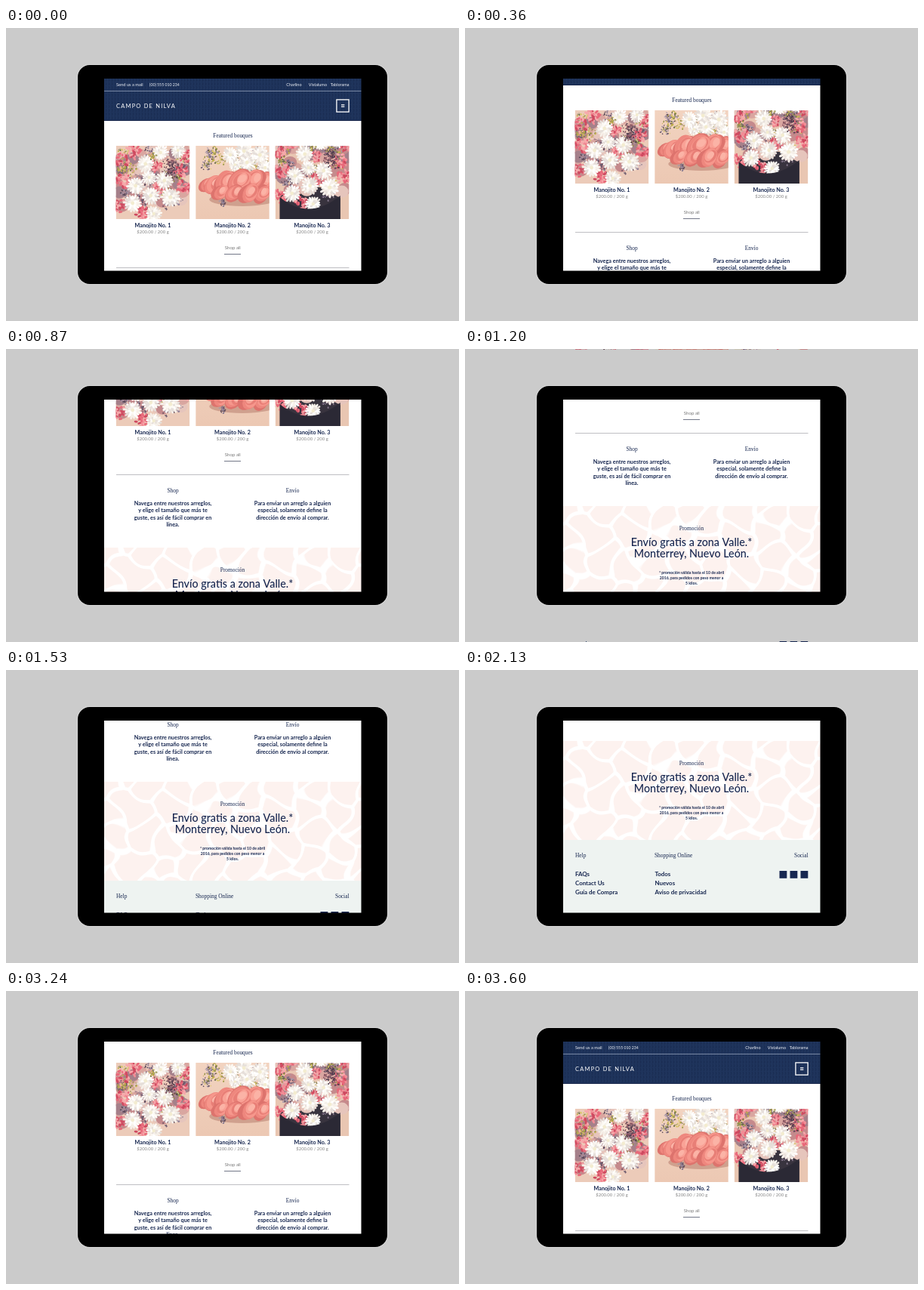
Write an HTML page with a canvas that moves like this. It is 600 by 388 pixels and loops after 4.4 s.

```html
<!DOCTYPE html>
<html lang="es">
<head>
<meta charset="utf-8">
<title>Tablet shop scroll</title>
<style>
html, body { margin: 0; width: 100%; height: 100%; overflow: hidden; background: #cbcbcb; }
canvas { display: block; }
</style>
</head>
<body>
<canvas id="stage" width="600" height="388"></canvas>
<script>
const W = 600, H = 388, LOOP = 4400, STEP = 30;
const SCREEN = { x: 130, y: 67, w: 340.5, h: 254.5 };
const NAVY = '#172750', SANS = 'Lato, sans-serif', SERIF = '"Liberation Serif", serif';
const TAU = Math.PI * 2;

const page = document.createElement('canvas');
page.width = W;
page.height = 720;
const p = page.getContext('2d');
const stage = document.getElementById('stage').getContext('2d');

let seed = 7;
function rnd(a = 0, b = 1) {
  seed = (seed * 16807) % 2147483647;
  return a + (b - a) * seed / 2147483647;
}
const pick = list => list[Math.floor(rnd(0, list.length))];

function rect(x, y, w, h, color) {
  p.fillStyle = color;
  p.fillRect(x, y, w, h);
}

function oval(x, y, rx, ry, color, turn = 0) {
  p.fillStyle = color;
  p.beginPath();
  p.ellipse(x, y, rx, ry, turn, 0, TAU);
  p.fill();
}

function text(str, x, y, size, { font = SANS, weight = 400, color = NAVY, align = 'left', spacing = 0 } = {}) {
  p.font = `${weight} ${size}px ${font}`;
  p.letterSpacing = spacing + 'px';
  p.textAlign = align;
  p.fillStyle = color;
  p.fillText(str, x, y);
}

const heading = (str, x, y, align = 'center') => text(str, x, y, 7.4, { font: SERIF, align });

function lines(list, x, y, gap, size, style) {
  list.forEach((str, i) => text(str, x, y + i * gap, size, style));
}

// Flowers, in the local space of a photo
function mum(x, y, r) {
  for (let ring = 3; ring > 0; ring--) {
    const count = 5 + ring * 4, twist = rnd();
    for (let i = 0; i < count; i++) {
      const a = twist + i / count * TAU, d = r * ring * rnd(0.2, 0.28);
      oval(x + Math.cos(a) * d, y + Math.sin(a) * d, r * 0.26, r * 0.13,
        pick(['#ffffff', '#fdfaf4', '#f6f0e9', '#e6dfda']), a);
    }
  }
  oval(x, y, r * 0.2, r * 0.2, '#f3ecd0');
}

function carnation(x, y, r) {
  for (let i = 0; i < 34; i++) {
    const a = rnd(0, TAU), d = r * Math.sqrt(rnd()) * 0.9;
    oval(x + Math.cos(a) * d, y + Math.sin(a) * d, r * 0.26, r * 0.14,
      pick(['#e8697a', '#f28d96', '#cf4a60', '#f6a9ab']), rnd(0, 3));
  }
}

function sprig(x, y, r, colors) {
  for (let i = 0; i < 24; i++) {
    const a = rnd(0, TAU), d = r * rnd();
    oval(x + Math.cos(a) * d, y + Math.sin(a) * d, rnd(0.6, 1.7), rnd(0.5, 1.1), pick(colors), rnd(0, 3));
  }
}

// Slanted petals, folded over each other from dark to light
function rose(x, y, r) {
  ['#dd736d', '#ee877e', '#f6978c', '#e87f77', '#f9a296', '#fbb3a6'].forEach((color, i) => {
    const size = r * (1 - i * 0.13);
    oval(x + rnd(-2, 2) + i * 0.8, y - i * 0.7, size * 0.72, size * 1.05, color, 0.7 + rnd(-0.4, 0.4));
  });
}

const DUSK = ['#6c5a70', '#8b7d92', '#5a4858', '#a898aa'];
const BERRY = ['#7d4a58', '#5b4354', '#9a6672', '#4b3b4c'];
const LEAF = ['#c1b04c', '#96924a', '#6b7048', '#d8c762'];
const MUMS = [[39, 24, 12], [59, 9, 11], [64, 46, 12], [26, 53, 12], [46, 66, 12],
  [22, 76, 12], [72, 68, 13], [82, 6, 10], [44, 42, 10], [50, 90, 11]];
const CARNATIONS = [[7, 20, 11], [9, 47, 11], [53, 26, 9], [90, 54, 10], [23, 7, 11],
  [86, 33, 10], [5, 80, 10], [56, 56, 9], [93, 14, 9], [34, 89, 10]];

function bouquet(dy) {
  p.save();
  p.translate(0, dy);
  for (let i = 0; i < 45; i++) oval(rnd(0, 97), rnd(0, 80), 9, 8, pick(['#c58a8c', '#d9a6a0', '#a5808a', '#e6c5bc']));
  for (let i = 0; i < 22; i++) sprig(rnd(0, 95), rnd(0, 82), 9, i % 3 ? DUSK : LEAF);
  CARNATIONS.forEach(f => carnation(...f));
  MUMS.forEach(f => mum(...f));
  for (let i = 0; i < 4; i++) sprig(70 + i % 2 * 7, 24 + i * 4, 9, BERRY);
  sprig(8, 32, 7, LEAF);
  sprig(49, 14, 6, LEAF);
  sprig(14, 62, 8, DUSK);
  p.restore();
}

function photoBouquet() {
  rect(0, 0, 98, 98, '#eccbb9');
  bouquet(0);
}

function photoRoses() {
  const g = p.createLinearGradient(0, 0, 0, 97);
  g.addColorStop(0, '#f2d3c0');
  g.addColorStop(1, '#ecc8b3');
  rect(0, 0, 98, 98, g);
  oval(62, 71, 44, 9, '#cfa08e');
  for (let i = 0; i < 14; i++) sprig(rnd(14, 97), rnd(6, 36), 9, i % 3 ? DUSK : LEAF);
  [[46, 12, 11], [64, 7, 12], [85, 12, 13], [68, 22, 12], [92, 29, 11], [52, 25, 9]].forEach(f => mum(...f));
  sprig(18, 22, 10, LEAF);
  sprig(25, 9, 8, LEAF);
  [[91, 48, 14], [14, 52, 11], [77, 46, 17], [24, 52, 15], [39, 48, 17],
    [58, 47, 18], [88, 64, 13], [33, 62, 12], [51, 63, 13], [71, 63, 15]].forEach(f => rose(...f));
  sprig(36, 75, 5, DUSK);
}

function photoBox() {
  rect(0, 0, 98, 98, '#e9c6b2');
  rect(6, 70, 80, 28, '#2b2935');
  oval(46, 70, 40, 16, '#38333e');
  bouquet(-13);
  p.beginPath();
  p.moveTo(6, 68);
  p.quadraticCurveTo(44, 100, 86, 66);
  p.lineTo(86, 98);
  p.lineTo(6, 98);
  p.fillStyle = '#2b2935';
  p.fill();
}

function photo(x, draw) {
  p.save();
  p.beginPath();
  p.rect(x, 156, 97.5, 97);
  p.clip();
  p.translate(x, 156);
  draw();
  p.restore();
}

// Pale cells parted by soft white veins
function drawCells(x0, y0, w, h) {
  const img = p.createImageData(w, h), points = [];
  for (let j = -1; j < 6; j++) {
    for (let i = -1; i < 11; i++) {
      points.push([(i + 0.5 * (j & 1)) * 38 + rnd(0, 30), j * 32 + rnd(0, 26)]);
    }
  }
  for (let y = 0; y < h; y++) {
    for (let x = 0; x < w; x++) {
      const wx = x + 6 * Math.sin(y / 9) + 2 * Math.sin(x / 6);
      const wy = y + 6 * Math.sin(x / 11 + 1);
      let near = 1e9, next = 1e9;
      for (const [px, py] of points) {
        const d = Math.hypot(wx - px, wy - py);
        if (d < near) { next = near; near = d; } else if (d < next) next = d;
      }
      const k = Math.max(0, Math.min(1, (next - near - 3.5) / 2));
      img.data.set([255 - 2 * k, 255 - 13 * k, 255 - 16 * k, 255], (y * w + x) * 4);
    }
  }
  p.putImageData(img, x0, y0);
}

function drawHeader() {
  rect(130, 67, 341, 56, '#1f345c');
  p.strokeStyle = '#192a4d';
  p.lineWidth = 0.8;
  p.beginPath();
  for (let y = 67; y < 121; y += 5) {
    for (let x = 132; x < 470; x += 4) {
      p.moveTo(x, y);
      p.lineTo(x + 1, y + 2);
      p.lineTo(x, y + 4);
    }
  }
  p.stroke();
  rect(130, 122, 341, 1, '#17254a');
  rect(130, 83, 341, 1, '#7888a5');

  const small = { color: '#eef1f7' };
  text('Send us a mail', 146, 77, 5.7, small);
  text('(00) 555 010 234', 190, 77, 5.2, small);
  [['Charlino', 391.5], ['Vistalumo', 425], ['Tablorama', 454.5]]
    .forEach(([name, x]) => text(name, x, 77, 5.5, { ...small, align: 'right' }));
  text('CAMPO DE NILVA', 146, 106.3, 7.5, { color: '#fff', spacing: 1.2 });

  p.strokeStyle = '#fff';
  p.lineWidth = 1.3;
  p.strokeRect(437.9, 94.9, 16.2, 16.2);
  for (let i = 0; i < 3; i++) rect(444, 101 + i * 1.6, 4.4, 0.8, '#fff');
}

function drawProducts() {
  heading('Featured bouques', 300.5, 145.4);
  [photoBouquet, photoRoses, photoBox].forEach((draw, i) => {
    const x = 145.7 + i * 105.5, mid = x + 48.8;
    photo(x, draw);
    text('Manojito No. ' + (i + 1), mid, 264, 7.2, { weight: 700, align: 'center' });
    text('$200.00 / 200 g', mid, 272.3, 5.9, { color: '#858585', align: 'center' });
  });
  text('Shop all', 300.3, 293, 6.1, { color: '#777', align: 'center' });
  rect(289, 299, 22, 1, '#737888');
  rect(146, 317, 308.5, 1, '#bfbfc3');
}

function drawInfo() {
  const body = { weight: 700, align: 'center' };
  heading('Shop', 221, 340.5);
  heading('Envío', 379.5, 340.5);
  lines(['Navega entre nuestros arreglos,', 'y elige el tamaño que más te',
    'guste, es así de fácil comprar en', 'línea.'], 221, 358, 9.3, 7.3, body);
  lines(['Para enviar un arreglo a alguien', 'especial, solamente define la',
    'dirección de envío al comprar.'], 379.5, 358, 9.3, 7.3, body);
}

function drawPromo() {
  drawCells(130, 414, 341, 131);
  heading('Promoción', 300, 445.5);
  lines(['Envío gratis a zona Valle.*', 'Monterrey, Nuevo León.'], 300, 467.3, 15, 14.3,
    { weight: 500, align: 'center' });
  lines(['* promoción válida hasta el 10 de abril', '2016, para pedidos con peso menor a', '5 kilos.'],
    300, 504, 6.9, 5.1, { weight: 700, align: 'center' });
}

function drawFooter() {
  rect(130, 545, 341, 97, '#eef3f1');
  heading('Help', 146, 567.7, 'left');
  heading('Shopping Online', 251, 567.7, 'left');
  heading('Social', 454.5, 567.7, 'right');
  const link = { weight: 700 };
  lines(['FAQs', 'Contact Us', 'Guía de Compra'], 146, 593, 12, 7.9, link);
  lines(['Todos', 'Nuevos', 'Aviso de privacidad'], 251.5, 593, 12, 7.9, link);
  for (let i = 0; i < 3; i++) rect(416.5 + i * 14, 586, 9.8, 9.8, NAVY);
}

function drawPage() {
  rect(130, 67, 341, 575, '#fff');
  drawHeader();
  drawProducts();
  drawInfo();
  drawPromo();
  drawFooter();
}

// Scroll keys: time, offset, speed
const KEYS = [[0, 0, 0], [360, 46.6, 0.19], [870, 151.3, 0.19], [1530, 266.3, 0.22], [1800, 320, 0],
  [2100, 320, 0], [2790, 206, -0.28], [3600, 0, 0], [LOOP, 0, 0]];

function scrollAt(time) {
  const i = KEYS.findIndex(key => key[0] > time);
  const [t0, y0, v0] = KEYS[i - 1], [t1, y1, v1] = KEYS[i];
  const d = t1 - t0, u = (time - t0) / d, w = 1 - u;
  return y0 * w * w * (1 + 2 * u) + v0 * d * u * w * w + y1 * u * u * (3 - 2 * u) - v1 * d * u * u * w;
}

function render(time) {
  const y = Math.round(scrollAt(Math.floor(time / STEP) * STEP));
  stage.fillStyle = '#cbcbcb';
  stage.fillRect(0, 0, W, H);

  // The page peeks through at the top and bottom edges
  stage.globalCompositeOperation = 'darken';
  for (const row of [0, H - 1]) stage.drawImage(page, 130, y + row, 341, 1, 130, row, 341, 1);
  stage.globalCompositeOperation = 'source-over';

  // Tablet body with a faint light rim
  stage.fillStyle = '#000';
  stage.strokeStyle = '#d8d8d8';
  stage.lineWidth = 2;
  stage.beginPath();
  stage.roundRect(95, 49, 410, 290, 16);
  stage.stroke();
  stage.fill();

  stage.save();
  stage.beginPath();
  stage.rect(SCREEN.x, SCREEN.y, SCREEN.w, SCREEN.h);
  stage.clip();
  stage.drawImage(page, 0, -y);
  stage.restore();
}

drawPage();
const start = performance.now();
function tick() {
  render((performance.now() - start) % LOOP);
  requestAnimationFrame(tick);
}
tick();
</script>
</body>
</html>
```
